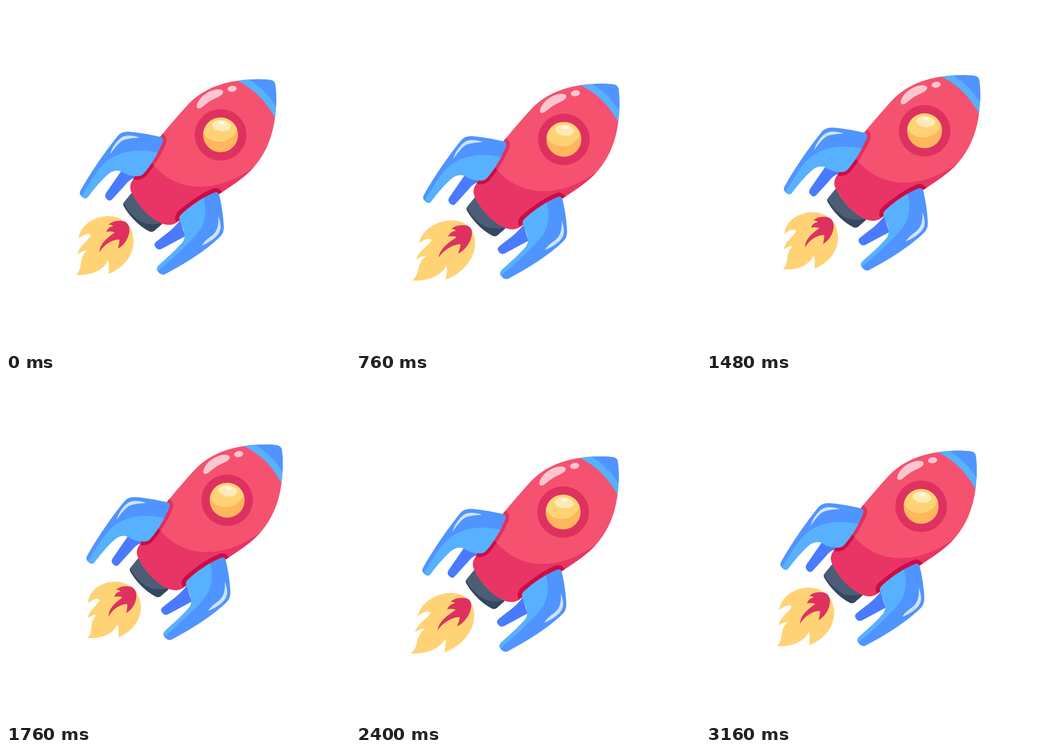
These frames come from a looping animation (747x750 px, 3200 ms). An HTML page with a canvas:

```html
<!DOCTYPE html>
<html lang="en">
<head>
<meta charset="utf-8">
<title>Rocket</title>
<style>
  html, body { margin: 0; width: 100%; height: 100%; overflow: hidden; background: #fff; }
  canvas { display: block; }
</style>
</head>
<body>
<canvas id="stage" width="747" height="750"></canvas>
<script>
const ctx = document.getElementById('stage').getContext('2d');

const RED = '#f5526f', CRIMSON = '#e93565', RING = '#df3160', WINE = '#cb0d45';
const BLUE = '#5094ff', SKY = '#57b1ff', INDIGO = '#4a7aff';
const SLATE = '#4c5d75', NAVY = '#33475f';
const YELLOW = '#ffd375', ORANGE = '#ffb75e';

const path = d => new Path2D(d);

const body = path(`M502 163 C527 159 553 159 573 161 Q584 162 585 173 C588 198 587 220 584 244
  C578 290 561 329 530 360 C512 378 488 393 463 410 L378 466 C368 476 357 479 345 476
  C318 469 288 438 274 409 Q267 396 272 385 L284 364 C300 335 318 307 338 281
  C357 258 377 235 396 214 C424 185 460 169 502 163 Z`);
const shade = path('M304 322 C328 368 374 394 420 394 C466 394 506 376 546 345 L600 520 L230 520 L250 340 Z');
const noseBand = path('M502 163 C538 180 566 209 584 244 L620 240 L610 130 L500 140 Z');
const noseTip = path('M526 159 C552 175 573 196 588 222 L620 220 L610 130 L520 140 Z');
const gloss = path(`M414 219 C416 204 430 192 443 186 C455 181 467 180 471 185
  C474 192 464 197 455 201 C441 207 432 216 424 222 Q415 226 414 219 Z`);

const nozzle = path(`M273 407 L256 428 Q253 432 256 437 C270 461 292 482 313 492
  Q318 493 322 490 L339 475 L310 440 Z`);
const nozzleShade = path('M253 427 C270 456 292 475 313 475 C322 476 331 475 338 472 L345 500 L250 500 Z');

const leftFin = path(`M338 286 C312 280 286 275 264 274 Q250 274 242 284 C214 319 185 361 162 402
  Q158 409 163 414 Q172 424 178 416 C194 395 209 377 225 364 Q238 356 249 360
  C260 368 272 371 286 371 Q295 371 301 363 C317 344 330 321 340 298 Q343 289 338 286 Z`);
const leftLight = path(`M167 418 L165 412 C181 388 197 356 217 340 C246 315 288 310 332 320
  L310 390 L180 440 Z`);
const leftGlint = path(`M226 324 C229 310 239 296 249 288 C259 280 276 282 290 287
  C271 288 260 290 252 294 C242 301 234 312 226 324 Z`);
const leftSmall = path('M250 360 L217 408 Q213 415 218 420 Q225 428 231 421 L260 389 Q268 378 279 375 L280 366 Z');
const leftSeam = path('M334 282 Q347 286 342 299 C332 323 318 345 301 366 Q292 376 279 373');

const rightFin = path(`M455 406 C430 415 401 435 380 455 Q375 460 377 466 C382 479 388 489 388 502
  Q388 511 380 519 C364 537 347 551 330 567 Q325 573 330 579 Q337 588 345 585
  C386 563 432 535 464 504 Q473 496 473 482 C472 457 468 433 463 412 Q461 405 455 406 Z`);
const rightLight = path(`M428 416 C438 450 432 478 412 500 C390 525 360 552 330 578
  L310 575 L350 440 Z`);
const rightGlint = path(`M461 458 C469 480 468 492 455 504 C446 512 436 518 425 522
  C431 512 440 506 448 500 C459 490 462 479 461 458 Z`);
const rightSmall = path('M378 467 C370 478 358 490 345 499 L326 514 Q320 519 324 525 Q329 533 337 530 L389 502 Z');
const rightSeam = path('M374 468 Q370 460 377 452 C399 433 425 414 449 404 Q461 399 466 411');

const flame = path(`M152 586 C164 575 161 563 164 553 C166 545 170 539 176 533 C167 534 161 537 156 541
  C157 524 181 510 184 500 C180 493 167 499 158 507 C159 480 190 458 222 458
  C255 458 277 481 277 512 C277 545 255 571 223 584 C222 573 226 565 221 555
  C212 577 184 588 152 586 Z`);
const flameCore = path(`M203 537 C203 519 220 505 236 494 C230 491 224 491 218 493 C220 485 226 481 233 480
  C230 477 227 476 223 477 C229 469 246 466 258 470 Q268 475 268 487
  C268 504 258 521 243 529 C245 521 247 514 246 509 C230 509 212 521 203 537 Z`);

function fill(p, color) {
  ctx.fillStyle = color;
  ctx.fill(p);
}

function clipped(shape, draw) {
  ctx.save();
  ctx.clip(shape);
  draw();
  ctx.restore();
}

function oval(x, y, rx, ry, color, tilt = 0) {
  ctx.beginPath();
  ctx.ellipse(x, y, rx, ry, tilt, 0, Math.PI * 2);
  ctx.fillStyle = color;
  ctx.fill();
}

function seam(p, color) {
  ctx.strokeStyle = color;
  ctx.lineWidth = 11;
  ctx.stroke(p);
}

function drawWindow() {
  oval(466, 281, 56, 56, RING);
  const glass = new Path2D();
  glass.arc(466, 281, 38, 0, Math.PI * 2);
  fill(glass, ORANGE);
  clipped(glass, () => oval(463, 256, 41, 40, YELLOW));
  oval(468, 261, 20.5, 12, '#ffe9b5', 0.12);
  oval(469, 255, 7, 4, '#fff6e2', 0.12);
}

function drawFin(shape, light, glint) {
  fill(shape, BLUE);
  clipped(shape, () => fill(light, SKY));
  fill(glint, '#cfe2ff');
}

function drawRocket() {
  fill(leftSmall, INDIGO);
  fill(rightSmall, INDIGO);
  fill(nozzle, SLATE);
  clipped(nozzle, () => fill(nozzleShade, NAVY));

  fill(body, RED);
  clipped(body, () => {
    fill(shade, CRIMSON);
    fill(noseBand, SKY);
    fill(noseTip, BLUE);
    seam(leftSeam, RING);
    clipped(shade, () => seam(leftSeam, WINE));
    seam(rightSeam, WINE);
  });
  fill(gloss, '#fcc6d1');
  oval(491, 180.5, 10, 6.5, '#fcc6d1', -0.15);
  drawWindow();

  drawFin(leftFin, leftLight, leftGlint);
  drawFin(rightFin, rightLight, rightGlint);
}

// The flame scales and leans about a point at the nozzle.
function drawFlame(size, lean) {
  ctx.save();
  ctx.translate(270, 474);
  ctx.transform(size, 0, lean, size, 0, 0);
  ctx.translate(-270, -474);
  fill(flame, YELLOW);
  fill(flameCore, RING);
  ctx.restore();
}

// Each track is a list of [time, value] keys with eased steps between them.
const moveX = [[0, 0], [400, 40.5], [800, -16.2], [1200, 40.5], [1600, 0]];
const moveY = [[0, 0], [400, -41.4], [800, 11.2], [1200, -41.4], [1600, 0]];
const flameSize = [[0, 1], [400, 0.889], [800, 1.029], [1200, 0.889], [1600, 1]];
const flameLean = [[0, 0], [400, 0.144], [800, -0.12], [1400, 0.045], [1600, 0]];

function at(track, t) {
  const i = track.findIndex(key => key[0] > t);
  const [t0, a] = track[i - 1], [t1, b] = track[i];
  const u = (t - t0) / (t1 - t0);
  return a + (b - a) * u * u * (3 - 2 * u);
}

const STEP = 40, CYCLE = 1600;
const start = performance.now();

function render(now) {
  const t = Math.floor(Math.max(0, now - start) / STEP) * STEP % CYCLE;
  ctx.fillStyle = '#fff';
  ctx.fillRect(0, 0, 747, 750);
  ctx.save();
  ctx.translate(at(moveX, t), at(moveY, t));
  drawFlame(at(flameSize, t), at(flameLean, t));
  drawRocket();
  ctx.restore();
  requestAnimationFrame(render);
}
render(start);
</script>
</body>
</html>
```
